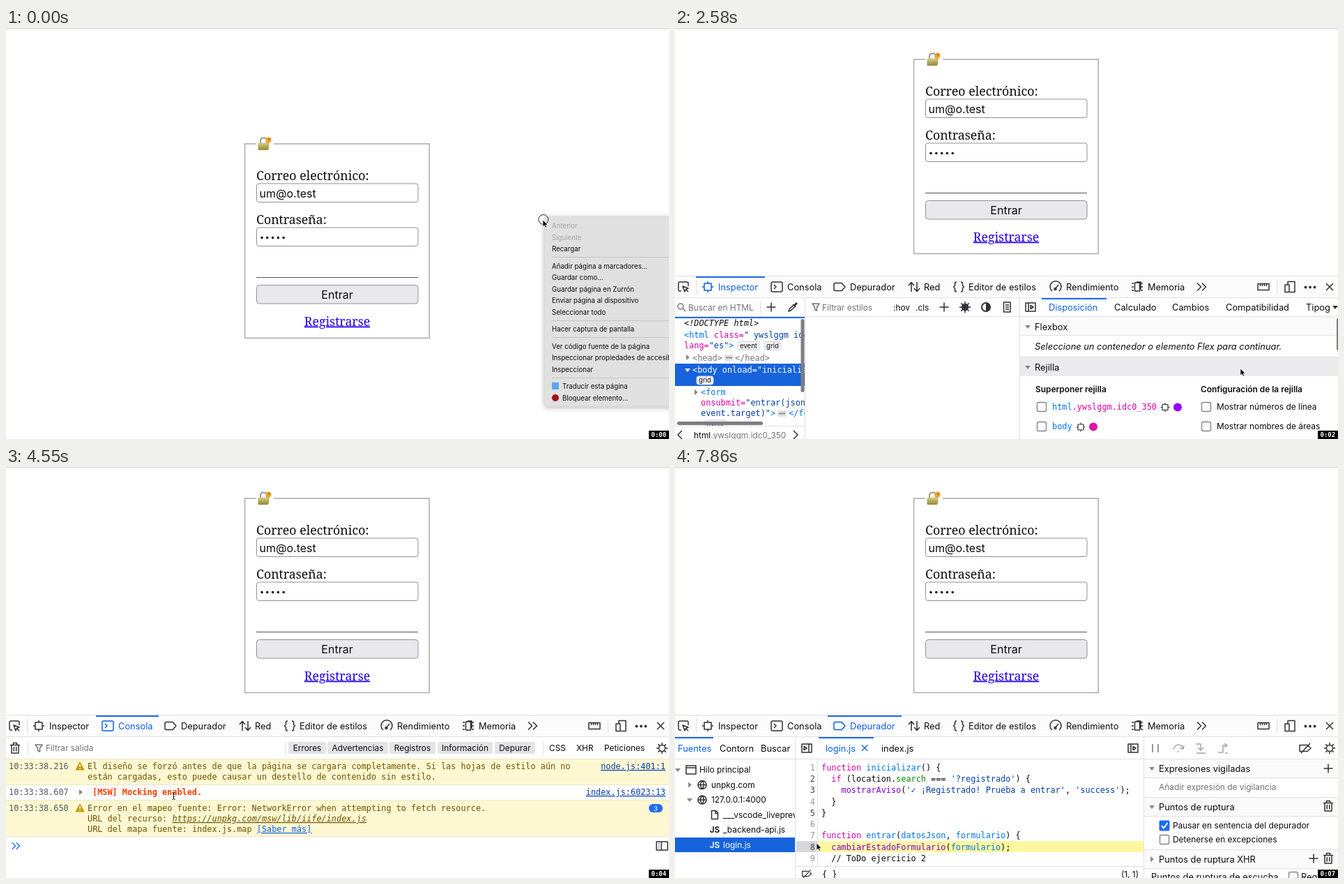
These frames come from a looping animation (951 by 589 pixels, 8 s). An HTML page:

```html
<!DOCTYPE html>
<html lang="es">
<head>
<meta charset="utf-8">
<title>Formulario y herramientas</title>
<style>
html, body { margin: 0; width: 100%; height: 100%; overflow: hidden; background: #fff; }
svg { display: block; width: 100vw; height: 100vh; font: 12.85px Inter, sans-serif; }
text { white-space: pre; fill: #0c0c0d; }
.small { font-size: 11.9px; }
.menu { font-size: 9.7px; }
.tip { font-size: 8px; }
.serif { font: 17.75px "Noto Serif", serif; }
.field { font-size: 16px; }
.mono { font: 11.86px "DejaVu Sans Mono", monospace; }
.clock { font: bold 9px "DejaVu Sans Mono", monospace; fill: #fff; }
.bold { font-weight: 600; }
.heavy { font-weight: bold; }
.ital { font-style: italic; }
.line { text-decoration: underline; }
.end { text-anchor: end; }
.mid { text-anchor: middle; }
.gray { fill: #737378; }
.white { fill: #fff; }
.blue { fill: #0a5fe6; }
.brown { fill: #715100; }
.kw { fill: #dd00a9; }
.fn { fill: #0074e8; }
.str { fill: #003eaa; }
.call { fill: #8000d7; }
.prop { fill: #058b00; }
.icon { fill: none; stroke: currentColor; stroke-width: 1.5; stroke-linejoin: round; }
svg { color: #303036; }
.row rect, .tab rect { visibility: hidden; }
.row.hot rect, .tab.hot .back, .tab.hot .bar, .tab.active .bar { visibility: inherit; }
.row.hot text { fill: #fff; }
.tab .bar { fill: #c4c4c9; }
.tab.active { color: #0a5fe6; }
.tab.active text { fill: #0a5fe6; }
.tab.active .bar { fill: #1f6cf3; }
</style>
</head>
<body>
<svg id="stage" viewBox="0 0 951 589"></svg>
<script>
const LOOP = 8000, STEP = 142.9;
const BLUE = '#1f6cf3', EDGE = '#e0e0e2', DIM = '#737378';

const glyphs = {
  pick: 'M7-1V-5Q7-7 5-7H-5Q-7-7-7-5V4Q-7 6-5 6H-3M-1-1 7 2 3.5 3.5 2 7ZM3 3 7 7',
  box: 'M-5-5H5V5H-5ZM0-8V-5M0 5V8M-8 0H-5M5 0H8',
  console: 'M-8-5Q-8-7-6-7H6Q8-7 8-5V5Q8 7 6 7H-6Q-8 7-8 5ZM-4-3-1 0-4 3',
  label: 'M-6-5.5H3L8 0 3 5.5H-6Q-8 5.5-8 3.5V-3.5Q-8-5.5-6-5.5Z',
  arrows: 'M-4 7V-6M-8-2-4-6.5 0-2M4-7V6M0 2 4 6.5 8 2',
  braces: 'M-3-7Q-5.5-7-5.5-4.5V-2L-7.5 0-5.5 2V4.5Q-5.5 7-3 7M3-7Q5.5-7 5.5-4.5V-2L7.5 0 5.5 2V4.5Q5.5 7 3 7',
  gauge: 'M-5 6A8 8 0 1 1 5 6M-1 3 4-3M-2 3a1.5 1.5 0 1 0 3 0a1.5 1.5 0 1 0-3 0',
  chip: 'M-3.5-6H3.5V6H-3.5ZM-8-5H-5M-8 0H-5M-8 5H-5M5-5H8M5 0H8M5 5H8M-1-7H5V4',
  more: 'M-6-5.5-.5 0-6 5.5M1-5.5 6.5 0 1 5.5',
  ruler: 'M-8-4.5H8V4.5H-8ZM-4.5-4V-1M-1.5-4V-1M1.5-4V-1M4.5-4V-1',
  devices: 'M-3-3V-7.5H7V7.5H0M-7-3H-1V7.5H-7Z',
  close: 'M-5-5 5 5M5-5-5 5',
  plus: 'M-6.5 0H6.5M0-6.5V6.5',
  trash: 'M-7-4.5H7M-2.5-5V-7.5H2.5V-5M-5-4V7H5V-4M-1.7-2V4.5M1.7-2V4.5',
  funnel: 'M-5-5H5L1.5 0V5L-1.5 3.5V0Z',
  gear: 'M-4.5 0a4.5 4.5 0 1 0 9 0a4.5 4.5 0 1 0-9 0M0-8V-5M0 5V8M-8 0H-5M5 0H8M-5.6-5.6-3.4-3.4M5.6-5.6 3.4-3.4M-5.6 5.6-3.4 3.4M5.6 5.6 3.4 3.4',
  search: 'M-5-1a4 4 0 1 0 8 0a4 4 0 1 0-8 0M2 2 6 6',
  dropper: 'M-6 6-5 3 1-3 3-1-3 5ZM0-4 4 0M2-3 5-6 6-5 3-2',
  page: 'M-4.5-7H5V7H-4.5ZM-2-3H3M-2 0H3M-2 3H3',
  pane: 'M-7-6H7V6H-7ZM-3-6V6M0-2.5 4 0 0 2.5Z',
  paneEnd: 'M-7-6H7V6H-7ZM3-6V6M-4-2.5 0 0-4 2.5Z',
  split: 'M-8-6H8V6H-8ZM-1-6V6M-5-3H-4M-5 0H-4M-5 3H-4',
  globe: 'M-6 0a6 6 0 1 0 12 0a6 6 0 1 0-12 0M-6 0H6M0-6Q-5 0 0 6Q5 0 0-6',
  window: 'M-7-6H7V6H-7ZM-7-3H7',
  file: 'M-4.5-6H1.5L4.5-3V6H-4.5ZM1-6V-2H4.5',
  pause: 'M-4-6V6M4-6V6',
  over: 'M-7 2Q-5-5 0-5 5-5 7 1M2 0 7 1 8-4M-1 5H1',
  into: 'M-7-6H0V3M-4-1 0 3 4-1M-6 7H7',
  out: 'M-7 6H0V-4H6M2-7 6-4 2-1M3 7H7',
  noBreak: 'M-8-4.5H3L8 0 3 4.5H-8ZM-6 7 7-7',
  back: 'M3-6-3 0 3 6', next: 'M-3-6 3 0-3 6',
  down: 'M-4-2H4L0 3Z', right: 'M-2-4V4L3 0Z'
};

const text = (x, y, str, cls = '') => `<text x="${x}" y="${y}" class="${cls}">${str}</text>`;
const rect = (x, y, w, h, fill, more = '') =>
  `<rect x="${x}" y="${y}" width="${w}" height="${h}" fill="${fill}" ${more}/>`;
const hline = (x, y, w, fill = EDGE) => rect(x, y, w, 1, fill);
const vline = (x, y, h, fill = EDGE) => rect(x, y, 1, h, fill);
const disc = (x, y, r, fill) => `<circle cx="${x}" cy="${y}" r="${r}" fill="${fill}"/>`;
const icon = (name, x, y, color = 'currentColor', scale = 1) =>
  `<path class="icon" style="stroke:${color}" d="${glyphs[name]}" transform="translate(${x} ${y}) scale(${scale})"/>`;
const arrow = (name, x, y, fill = '#87878d') =>
  `<path d="${glyphs[name]}" fill="${fill}" transform="translate(${x} ${y})"/>`;
const at = (from, to, ...parts) => `<g data-from="${from}" data-to="${to}">${parts.join('')}</g>`;
const crop = (x, y, w, h, ...parts) =>
  `<svg x="${x}" y="${y}" width="${w}" height="${h}" viewBox="${x} ${y} ${w} ${h}">${parts.join('')}</svg>`;
const [kw, fn, str, call, prop, gray] = ['kw', 'fn', 'str', 'call', 'prop', 'gray']
  .map(cls => s => `<tspan class="${cls}">${s}</tspan>`);
const check = (x, y) => rect(x + .5, y + .5, 13, 13, '#fff', 'rx="2" stroke="#85858c" stroke-width="1.4"');
const badge = (x, y, w, label) =>
  rect(x, y, w, 12, '#f4f4f6', 'rx="3" stroke="#d0d0d5"') +
  text(x + w / 2, y + 9.3, label, 'mid tip" style="font-size:9.6px');

function form() {
  const input = y => rect(359.5, y, 231.5, 26.5, '#fff', 'rx="3" stroke="#8f8f9d"');
  return `<g id="form">
    ${rect(342.6, 166, 264.6, 278.4, 'none', 'stroke="#b3b3b5" stroke-width="1.7"')}
    ${rect(359, 160, 25, 12, '#fff')}
    <path d="M365 165V162Q365 157.5 369.5 157.5T374 162V165" fill="none" stroke="#9a9c98" stroke-width="2.2"/>
    <path d="M376 160V173M376 169H373" stroke="#e0931d" stroke-width="2.4"/>
    ${disc(376.5, 160.5, 4, '#eba52b')}${disc(377.5, 159.3, 1.1, '#8a5a14')}
    ${rect(361.5, 164.5, 15, 10.5, 'url(#brass)', 'rx="1.5"')}
    ${text(359, 218, 'Correo electrónico:', 'serif')}${input(223)}
    ${text(363.5, 243, 'um@o.test', 'field')}
    ${text(359, 280.5, 'Contraseña:', 'serif')}${input(286)}
    ${[0, 1, 2, 3, 4].map(i => disc(367 + i * 7.8, 300.5, 1.7, '#000')).join('')}
    ${hline(359, 357, 232, '#555')}
    ${rect(359.5, 368.5, 231.5, 26.5, '#e9e9ed', 'rx="4" stroke="#8f8f9d"')}
    ${text(475, 388.3, 'Entrar', 'field mid')}
    ${text(475, 426.5, 'Registrarse', 'serif mid line" style="fill:#20e')}
  </g>`;
}

function menu() {
  const rows = [[283, 'Anterior'], [300, 'Siguiente'], [316.5, 'Recargar'],
    [341, 'Añadir página a marcadores…'], [357.5, 'Guardar como…'], [374, 'Guardar página en Zurrón'],
    [390.5, 'Enviar página al dispositivo'], [407, 'Seleccionar todo'], [431.5, 'Hacer captura de pantalla'],
    [456, 'Ver código fuente de la página'], [472.5, 'Inspeccionar propiedades de accesibilidad'],
    [489, 'Inspeccionar'], [513.5, 'Traducir esta página'], [530, 'Bloquear elemento…']];
  return rect(772, 270, 200, 272, '#e0e0e0', 'rx="5" stroke="#c9c9c9" stroke-width=".6" filter="url(#shade)"') +
    [328, 419, 443, 501].map(y => hline(783, y, 168, '#c6c6c6')).join('') +
    rows.map(([y, label], i) => i < 2
      ? text(783, y + 3.5, label, 'menu" style="fill:#a5a5a5')
      : `<g class="row" data-y="${y}">${rect(776, y - 8, 190, 16, '#509ffb', 'rx="3"')}
         ${text(i > 11 ? 798 : 783, y + 3.5, label, 'menu')}</g>`).join('') +
    rect(783, 508, 10, 10, '#5ea5f0') + disc(788, 530, 5, '#a50d18');
}

function toolbar() {
  const tabs = [['Inspector', 'box', 47, 62, 30, 129, 1870, 3270], ['Consola', 'console', 146, 161, 129, 219, 3270, 6420],
    ['Depurador', 'label', 236, 251, 219, 325, 6420, LOOP], ['Red', 'arrows', 343, 357, 325, 390],
    ['Editor de estilos', 'braces', 407, 421, 390, 529], ['Rendimiento', 'gauge', 546, 561, 529, 646],
    ['Memoria', 'chip', 663, 678, 646, 740]];
  return rect(0, 355, 951, 234, '#fff') + rect(0, 356, 951, 30, '#fcfcfd') + hline(0, 355, 951) + hline(0, 386, 951) +
    icon('pick', 12, 371) + vline(30, 361, 20) +
    tabs.map(([label, pic, ix, tx, left, right, from = -1, to = -1]) =>
      `<g class="tab" data-left="${left}" data-right="${right}" data-on="${from}" data-off="${to}">
       <rect class="back" x="${left}" y="356" width="${right - left}" height="30" fill="#ebebee"/>
       <rect class="bar" x="${left}" y="356" width="${right - left}" height="2"/>
       ${icon(pic, ix, 371)}${text(tx, 376, label)}</g>`).join('') +
    icon('more', 755, 371) + icon('ruler', 844, 371) + vline(863, 361, 20) + icon('devices', 882, 371) +
    [-6.5, 0, 6.5].map(d => disc(911 + d, 371.5, 1.9, '#303036')).join('') + icon('close', 939, 371);
}

function inspector() {
  const mono = (x, y, s, cls = '') => text(x, y, s, 'mono ' + cls);
  const dots = (x, y) => rect(x, y, 13, 9, '#e0e0e3', 'rx="2"') +
    [3.5, 6.5, 9.5].map(d => disc(x + d, y + 4.5, 1, '#444')).join('');
  const markup = crop(0, 414, 186, 156,
    mono(13, 427, '&lt;!DOCTYPE html>', 'ital'),
    mono(13, 444, fn('&lt;html ') + kw('class=') + str('" ywslggm idc0_350"')),
    mono(13, 459, kw('lang=') + str('"es"') + fn('>')), badge(90, 449.5, 31, 'event'), badge(128, 449.5, 24, 'grid'),
    arrow('right', 18, 472), mono(25, 476.5, '&lt;head>', 'gray'), dots(71, 468), mono(86, 476.5, '&lt;/head>', 'gray'),
    rect(0, 481, 186, 32, '#1663dc'), arrow('down', 18, 490, '#fff'),
    mono(25, 494, '&lt;body onload="inicializar()"', 'white'), badge(31, 499, 24, 'grid'),
    arrow('right', 30, 522), mono(37, 526, fn('&lt;form')),
    mono(37, 541, kw('onsubmit=') + str('"entrar(json(')),
    mono(37, 556, str('event.target)"') + fn('>')), dots(147, 548), mono(163, 556, fn('&lt;/form>')),
    badge(42, 562, 32, 'event'), rect(3, 564, 123, 5, '#7d7d82', 'rx="2.5"'),
    rect(180.5, 417, 5, 105, '#7d7d82', 'rx="2.5"'));
  const tabs = [[630, 'Calculado'], [713, 'Cambios'], [790, 'Compatibilidad'], [905, 'Tipog']];
  return icon('search', 9, 400, DIM) + text(19, 404.5, 'Buscar en HTML', 'small gray') + vline(122, 391, 18) +
    icon('plus', 138, 400) + icon('dropper', 169, 400) + hline(0, 413, 951) + markup + rect(0, 414, 186, 2, BLUE) +
    vline(186, 387, 202) + hline(0, 570, 186) + icon('back', 7, 583) + icon('next', 173, 583) +
    crop(20, 571, 142, 18, text(27, 587.5, 'html' + gray('.ywslggm.idc0_350'), 'small')) +
    icon('funnel', 202, 400, DIM) + text(211, 404.5, 'Filtrar estilos', 'small gray') +
    text(313, 404.5, ':hov', 'small') + text(345, 404.5, '.cls', 'small') + icon('plus', 386, 400) +
    icon('gear', 416, 400) + disc(416, 400, 4, '#303036') +
    disc(446, 400, 7, '#303036') + '<path d="M446 395A5 5 0 0 0 446 405Z" fill="#fff"/>' + icon('page', 476, 400) +
    vline(494, 387, 202) + icon('pane', 510, 400) + rect(526, 387, 93, 2, BLUE) + text(536, 405, 'Disposición', 'blue') +
    tabs.map(([x, s]) => text(x, 405, s)).join('') + arrow('down', 947, 400, '#303036') +
    rect(495, 414, 456, 26, '#fafafb') + arrow('down', 506, 428) + text(516, 432.5, 'Flexbox') + hline(495, 440, 456) +
    text(516, 461, 'Seleccione un contenedor o elemento Flex para continuar.', 'ital') +
    rect(495, 472, 456, 27, '#fafafb') + at(0, 2720, rect(495, 472, 456, 27, '#ebebee')) + hline(495, 471, 456) +
    arrow('down', 506, 486) + text(516, 490.5, 'Rejilla') +
    text(517, 521.5, 'Superponer rejilla', 'small bold') + text(754, 521.5, 'Configuración de la rejilla', 'small bold') +
    check(519, 536) + mono(541, 546.5, fn('html') + kw('.ywslggm.idc0_350')) +
    icon('box', 703, 543.5, '#303036', .8) + disc(721, 543.5, 6, '#9400ff') +
    check(519, 564) + mono(541, 575, fn('body')) + icon('box', 582, 572, '#303036', .8) + disc(600, 571.5, 6, '#df14a8') +
    check(755, 536) + text(777, 547, 'Mostrar números de línea', 'small') +
    check(755, 564) + text(777, 575, 'Mostrar nombres de áreas', 'small') +
    rect(949, 416, 4, 46, '#7d7d82', 'rx="2"');
}

function consoleView() {
  const line = (y, s, cls = 'brown', x = 117) => text(x, y, s, 'mono ' + cls);
  const warn = y => `<path d="M106 ${y - 5.5}L112 ${y + 5.5}H100Z" fill="#c99700" stroke="#c99700" stroke-linejoin="round"/>
    <path d="M106 ${y - 2.5}V${y + 1.5}M106 ${y + 3}V${y + 4.5}" stroke="#fff" stroke-width="1.5"/>`;
  const filters = [[405, 54, 'Errores'], [461, 87, 'Advertencias'], [550, 66, 'Registros'],
    [619, 79, 'Información'], [701, 58, 'Depurar']];
  return icon('trash', 13, 403) + vline(31, 393, 20) + icon('funnel', 47, 403, DIM) +
    text(57, 407, 'Filtrar salida', 'small gray') + vline(400, 393, 20) +
    filters.map(([x, w, s]) => rect(x, 394, w, 17, '#e4e4e6', 'rx="2"') + text(x + w / 2, 407, s, 'small mid')).join('') +
    vline(770, 393, 20) + [[779, 'CSS'], [818, 'XHR'], [858, 'Peticiones']].map(([x, s]) => text(x, 407, s, 'small')).join('') +
    icon('gear', 941, 403) +
    rect(0, 418, 951, 37, '#fdf8d2') + rect(0, 478, 951, 51, '#fdf8d2') +
    [418, 455, 477, 529].map(y => hline(0, y, 951, '#ece6c6')).join('') +
    ['216', '607', '650'].map((ms, i) => line([433, 470, 493][i], '10:33:38.' + ms, '" style="fill:#58585e', 4)).join('') +
    warn(428.5) + line(433, 'El diseño se forzó antes de que la página se cargara completamente. Si las hojas de estilo aún no') +
    line(448, 'están cargadas, esto puede causar un destello de contenido sin estilo.') +
    line(433, 'node.js:401:1', 'end line str', 946) +
    arrow('right', 107, 466) + line(470, '[MSW] Mocking enabled.', 'heavy" style="fill:#ff3c00', 124) +
    line(470, 'index.js:6023:13', 'end line str', 946) +
    warn(488.5) + line(493, 'Error en el mapeo fuente: Error: NetworkError when attempting to fetch resource.') +
    line(508, 'URL del recurso: <tspan class="ital line">https://unpkg.com/msw/lib/iife/index.js</tspan>') +
    line(523, 'URL del mapa fuente: index.js.map <tspan class="blue line">[Saber más]</tspan>') +
    rect(922, 483, 20, 12, BLUE, 'rx="6"') + text(932, 492.5, '3', 'mid white" style="font-size:9.5px') +
    icon('more', 14, 543, BLUE, .85) + icon('split', 941, 543);
}

function debuggerView() {
  const code = [
    `${kw('function')} ${fn('inicializar')}() {`,
    `  ${kw('if')} (location.${prop('search')} === ${str("'?registrado'")}) {`,
    `    ${call('mostrarAviso')}(${str("'✓ ¡Registrado! Prueba a entrar'")}, ${str("'success'")});`,
    '  }', '}', '',
    `${kw('function')} ${fn('entrar')}(${fn('datosJson')}, ${fn('formulario')}) {`,
    `  ${call('cambiarEstadoFormulario')}(${fn('formulario')});`,
    '  // ToDo ejercicio 2'];
  const breakable = [2, 3, 5, 8];
  const lines = code.map((s, i) => {
    const y = 434.8 + i * 16.25;
    return text(201, y, i + 1, 'mono end" style="fill:' + (breakable.includes(i + 1) ? '#45454b' : '#97979d')) +
      text(210, y, s, 'mono');
  }).join('');
  const tree = [[434, 35, 'Hilo principal'], [455.5, 52, 'unpkg.com'], [477, 52, '127.0.0.1:4000'],
    [498.5, 69, '___vscode_livepreview'], [520, 69, '_backend-api.js'], [541.5, 69, 'login.js']];
  const header = (y, s, dir = 'down') => rect(673, y - 13, 278, 27, '#fafafb') + hline(673, y - 14, 278) +
    hline(673, y + 13, 278) + arrow(dir, 684, y) + text(694, y + 4.8, s);
  return rect(0, 387, 55, 2, BLUE) + text(4, 408, 'Fuentes', 'blue') + text(64, 408, 'Contorn') + text(123, 408, 'Buscar') +
    hline(0, 418, 672) + rect(0, 531, 172, 21, '#1663dc') +
    crop(0, 419, 172, 170, tree.map(([y, x, s], i) => text(x, y + 4.3, s, 'small' + (i > 4 ? ' white' : ''))).join('')) +
    arrow('down', 4, 434) + icon('window', 23, 434) + arrow('right', 21, 455.5) + icon('globe', 39, 455.5) +
    arrow('down', 21, 477) + icon('globe', 39, 477) + icon('file', 57, 498.5) +
    text(57, 524, 'JS', 'small bold mid') + text(57, 545.5, 'JS', 'small bold mid white') +
    vline(172, 387, 202) + icon('paneEnd', 189, 403) + rect(206, 387, 79, 2, BLUE) + text(216, 407.5, 'login.js', 'blue') +
    icon('close', 272, 402.5, '#0a5fe6', .85) + text(296, 407.5, 'index.js') + icon('pane', 657, 403) +
    at(7560, LOOP, rect(174, 536, 31, 16, '#d7d7db'), rect(205, 536, 467, 16, '#fdf8a0')) +
    vline(204, 419, 153) + lines + hline(173, 572, 499) + icon('noBreak', 189, 583, '#303036', .8) +
    text(211, 588, '{ }', 'mono') + text(665, 588, '(1, 1)', 'small end') + vline(672, 387, 202) +
    icon('pause', 689, 403, '#77777d') + ['over', 'into', 'out'].map((n, i) => icon(n, 722 + i * 32, 403, '#a5a5aa')).join('') +
    icon('noBreak', 904, 403) + icon('gear', 939, 403) +
    header(432, 'Expresiones vigiladas') + icon('plus', 937, 432) +
    text(694, 463, 'Añadir expresión de vigilancia', 'small gray') +
    header(487, 'Puntos de ruptura') + icon('trash', 937, 486) +
    rect(694.5, 506.5, 15, 15, BLUE, 'rx="2"') +
    '<path d="M698 514 701 517.5 706.5 510" fill="none" stroke="#fff" stroke-width="2"/>' +
    text(714, 518, 'Pausar en sentencia del depurador', 'small') + check(695, 527) +
    text(714, 537.5, 'Detenerse en excepciones', 'small') +
    header(562, 'Puntos de ruptura XHR', 'right') + icon('plus', 916, 561) + icon('trash', 937, 561) +
    text(683, 592, 'Puntos de ruptura de escucha') + check(880, 580) + text(898, 592, 'Regi');
}

const highlight = rect(0, 1, 951, 354, '#87ceeb', 'opacity=".6"') + rect(348, 4, 254, 16.5, '#38383d', 'rx="2"') +
  text(352.5, 15, 'body', 'tip" style="fill:#d08ff0') + vline(375, 8, 9, '#77777c') +
  text(380, 15, '778.75 × 287.583', 'tip" style="fill:#fff') + vline(451, 8, 9, '#77777c') +
  text(456, 15, 'Contenedor o elemento de cuadrícula', 'tip" style="fill:#ccccd0');

const stage = document.getElementById('stage');
stage.innerHTML = `<defs>
    <linearGradient id="brass" x2="0" y2="1"><stop stop-color="#d8cf83"/><stop offset="1" stop-color="#8f8a3c"/></linearGradient>
    <filter id="shade"><feDropShadow dx="0" dy="2" stdDeviation="3.5" flood-opacity=".28"/></filter></defs>
  ${rect(0, 0, 951, 589, '#fff')}${rect(0, 0, 951, 1.5, '#dcdcdc')}
  ${form()}${at(0, 1870, menu())}${at(2850, 3550, highlight)}
  ${at(1870, LOOP, toolbar())}${at(2150, 3270, inspector())}
  ${at(3550, 6420, consoleView())}${at(6560, LOOP, debuggerView())}
  ${rect(922, 577, 29, 12, '#000')}${text(925.5, 586.3, '0:00', 'clock" id="clock')}
  <g id="cursor">
    <circle id="ring" cx=".8" cy="-.5" r="7" fill="none" stroke="#222"/>
    <path id="pointer" d="M0 0V10L2.3 8 4 11.3 5.7 10.5 4.1 7.2H7.2Z" fill="#000" stroke="#fff" stroke-width=".8"/>
    <path id="beam" d="M-2-5Q0-5 0-3.5V3.5Q0 5-2 5M2-5Q0-5 0-3.5M0 3.5Q0 5 2 5M-1 1H1" fill="none" stroke="#111"/>
  </g>`;

const path = [[0, 770, 275], [150, 770, 275], [1140, 811, 488], [2570, 811, 488], [2990, 120, 490], [3270, 188, 377],
  [4000, 188, 377], [4550, 244, 471], [4860, 20, 500], [5000, 33, 500], [5700, 200, 430], [6110, 288, 379],
  [7000, 288, 379], [7700, 203, 539], [LOOP, 203, 539]];
const ticks = [1140, 2280, 3400, 4540, 5690, 6560, 7700];
const clicks = [[0, 290], [1560, 1720], [3270, 3550], [6410, 6560]];

function cursorAt(t) {
  const i = path.findIndex(p => p[0] > t);
  const [t0, x0, y0] = path[i - 1], [t1, x1, y1] = path[i];
  const p = (t - t0) / (t1 - t0), ease = p * p * (3 - 2 * p);
  return [x0 + (x1 - x0) * ease, y0 + (y1 - y0) * ease];
}

const $ = id => document.getElementById(id);
const show = (el, on) => { el.style.display = on ? '' : 'none'; };
const within = (t, from, to) => t >= from && t < to;
const timed = [...stage.querySelectorAll('[data-from]')];
const rows = [...stage.querySelectorAll('.row')];
const tabs = [...stage.querySelectorAll('.tab')];

function render(t) {
  const [x, y] = cursorAt(Math.min(Math.floor((t + 25) / STEP) * STEP, LOOP - 1));
  for (const el of timed) show(el, within(t, +el.dataset.from, +el.dataset.to));
  for (const el of rows) el.classList.toggle('hot', Math.abs(y - el.dataset.y) < 8.2);
  for (const el of tabs) {
    const { left, right, on, off } = el.dataset;
    el.classList.toggle('active', within(t, +on, +off));
    el.classList.toggle('hot', within(x, +left, +right) && within(y, 356, 387));
  }
  $('form').setAttribute('transform', `translate(0 ${t < 1870 ? 0 : -121})`);
  $('cursor').setAttribute('transform', `translate(${x} ${y})`);
  const typing = within(t, 4000, 6000) && y > 418;
  show($('beam'), typing);
  show($('pointer'), !typing);
  show($('ring'), clicks.some(([from, to]) => within(t, from, to)));
  $('clock').textContent = '0:0' + ticks.filter(tick => t >= tick).length;
}

const start = performance.now();
function frame() {
  render((performance.now() - start) % LOOP);
  requestAnimationFrame(frame);
}
frame();
</script>
</body>
</html>
```
